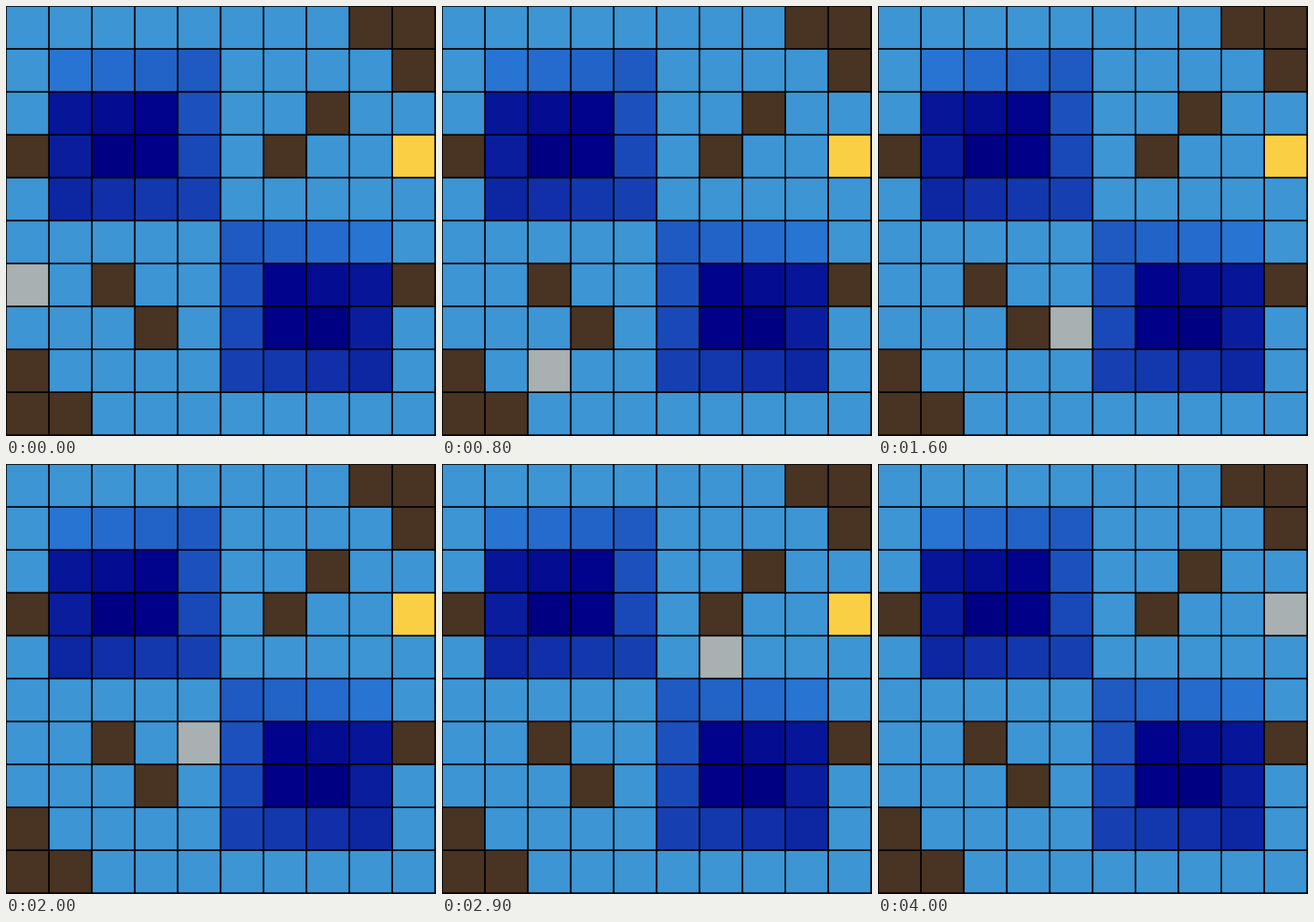
An HTML page with a canvas that plays this animation: 600x600 px, repeating every 4.1 s.

```html
<!DOCTYPE html>
<html lang="en">
<head>
<meta charset="utf-8">
<title>Grid route</title>
<style>
  html, body { margin: 0; height: 100%; overflow: hidden; background: #000; }
  canvas { display: block; }
</style>
</head>
<body>
<canvas width="600" height="600"></canvas>
<script>
const ctx = document.querySelector('canvas').getContext('2d');
const LOOP = 4100, CELL = 59.88, LINE = 2.2;
const WATER = '#3d95d4', ROCK = '#493322', GOAL = '#fbcf44', BOAT = '#a8b0b1';
const DIRS = { R: [1, 0], L: [-1, 0], D: [0, 1], U: [0, -1] };

// Cells visited from a start cell along a string of directions.
function walk(x, y, moves) {
  const cells = [[x, y]];
  for (const m of moves) {
    x += DIRS[m][0];
    y += DIRS[m][1];
    cells.push([x, y]);
  }
  return cells;
}

function fillCell([x, y], color) {
  ctx.fillStyle = color;
  ctx.fillRect(x * CELL, y * CELL, CELL, CELL);
}

const rocks = ['80', '90', '91', '72', '03', '63', '26', '96', '37', '08', '09', '19'];
const whirl = walk(1, 1, 'RRRDDDLLLUURRDL');
const route = walk(0, 6, 'DRDRRRUUURURRRRU');
const moveTimes = [1, 3, 5, 8, 11, 13, 16, 18, 21, 23, 26, 29, 31, 34, 36, 39];

function drawMap() {
  ctx.fillStyle = WATER;
  ctx.fillRect(0, 0, 600, 600);
  for (const [x, y] of rocks) fillCell([+x, +y], ROCK);
  whirl.forEach(([x, y], i) => {
    const color = `rgb(${Math.max(0, 40 - 3 * i)}, ${Math.max(0, 116 - 8.67 * i)}, ${210 - 5.3 * i})`;
    fillCell([x, y], color);
    fillCell([9 - x, y + 4], color);
  });
  fillCell([9, 3], GOAL);
}

function drawLines() {
  ctx.fillStyle = '#000';
  for (let i = 0; i <= 10; i++) {
    const edge = i * CELL - LINE / 2;
    ctx.fillRect(edge, 0, LINE, 600);
    ctx.fillRect(0, edge, 600, LINE);
  }
}

function draw(now) {
  const t = now % LOOP;
  drawMap();
  fillCell(route[moveTimes.filter(m => m * 100 <= t).length], BOAT);
  drawLines();
}

const start = performance.now();
function tick() {
  draw(performance.now() - start);
  requestAnimationFrame(tick);
}
tick();
</script>
</body>
</html>
```
